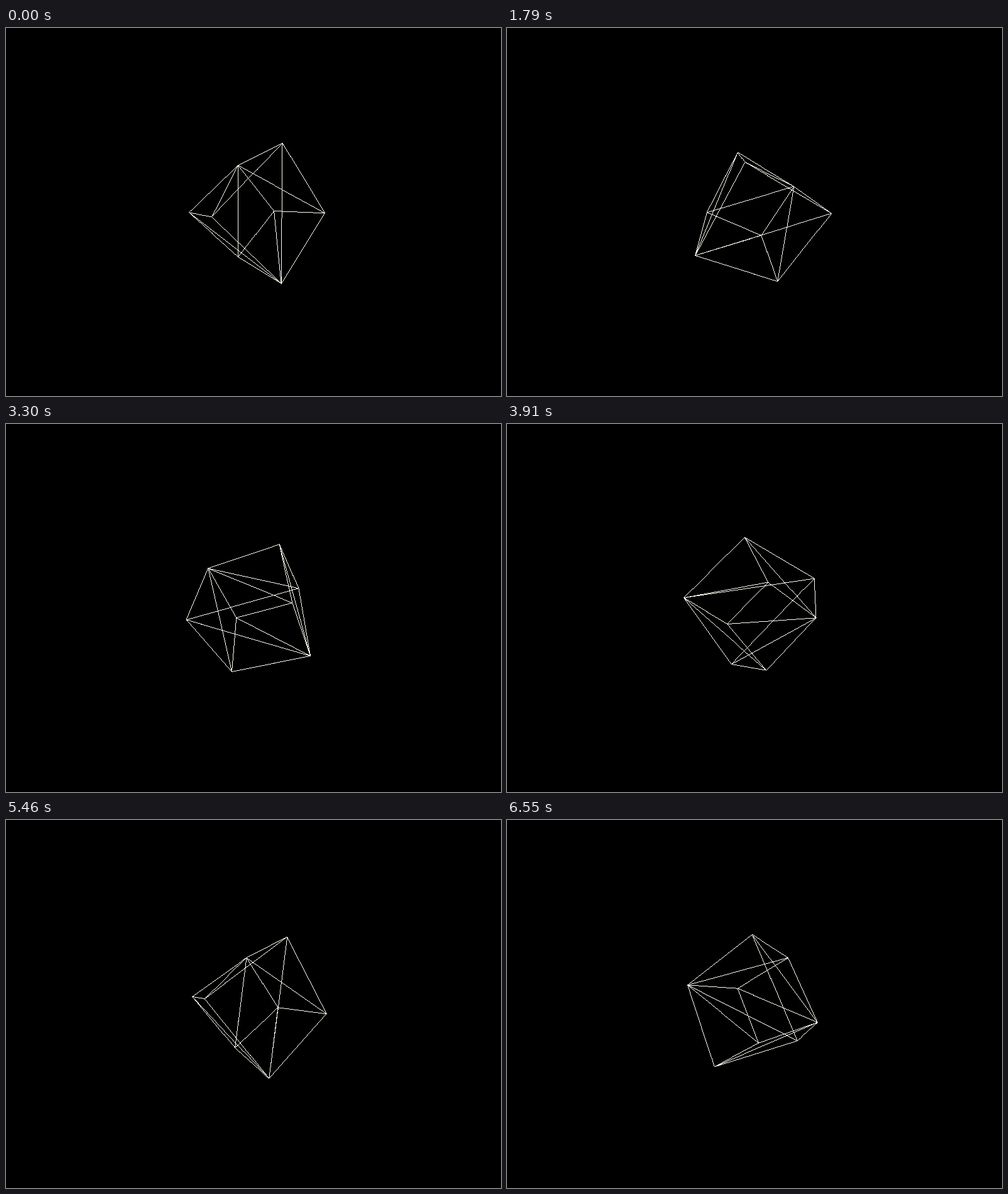
These frames come from a looping animation (788x586 px, 6.6 s). An HTML page with a canvas:

```html
<!DOCTYPE html>
<html>
<head>
<meta charset="utf-8">
<style>
  html, body { margin: 0; width: 100%; height: 100%; overflow: hidden; background: #000; }
  canvas { display: block; }
</style>
</head>
<body>
<canvas id="stage" width="788" height="586"></canvas>
<script>
const ctx = document.getElementById('stage').getContext('2d');
const LOOP = 6600, STEPS = 140;
const CENTER = [396.4, 293.8], FOCAL = 250, DISTANCE = 4;
const AXIS = [1, 2, 3].map(v => v / Math.sqrt(14));

// [step, angle in radians]: an almost constant spin
const SPIN = [[0, .965], [18, 1.922], [38, 2.993], [57, 3.986], [83, 5.357], [116, 7.09], [139, 8.343]];

const corners = [];
for (const x of [-1, 1]) for (const y of [-1, 1]) for (const z of [-1, 1]) corners.push([x, y, z]);

// Cube edges, plus the face diagonals that start at two opposite corners
const isHub = ([x, y, z]) => x === y && y === -z;
const lines = [];
corners.forEach((a, i) => corners.forEach((b, j) => {
  if (j <= i) return;
  const differing = a.filter((v, k) => v !== b[k]).length;
  if (differing === 1 || (differing === 2 && (isHub(a) || isHub(b)))) lines.push([i, j]);
}));

// Steps are evenly spaced, each starting on a whole 10 ms
function stepAt(time) {
  const tick = Math.floor(time % LOOP / 10) * 10;
  return Math.min(STEPS - 1, Math.floor((tick + 9.9) * STEPS / LOOP));
}

function angleAt(step) {
  let i = 1;
  while (step > SPIN[i][0]) i++;
  const [s0, a0] = SPIN[i - 1], [s1, a1] = SPIN[i];
  return a0 + (a1 - a0) * (step - s0) / (s1 - s0);
}

function rotate([x, y, z], angle) {
  const [a, b, c] = AXIS, cos = Math.cos(angle), sin = Math.sin(angle);
  const along = (a * x + b * y + c * z) * (1 - cos);
  return [
    x * cos + (b * z - c * y) * sin + a * along,
    y * cos + (c * x - a * z) * sin + b * along,
    z * cos + (a * y - b * x) * sin + c * along
  ];
}

function project([x, y, z]) {
  const scale = FOCAL / (DISTANCE - z);
  return [CENTER[0] + x * scale, CENTER[1] - y * scale];
}

// One-pixel line without smoothing
function drawLine([x0, y0], [x1, y1]) {
  const n = Math.ceil(Math.max(Math.abs(x1 - x0), Math.abs(y1 - y0), 1));
  for (let i = 0; i <= n; i++) {
    ctx.fillRect(Math.round(x0 + (x1 - x0) * i / n), Math.round(y0 + (y1 - y0) * i / n), 1, 1);
  }
}

function draw(time) {
  const angle = angleAt(stepAt(time));
  const points = corners.map(p => project(rotate(p, angle)));
  ctx.fillStyle = '#000';
  ctx.fillRect(0, 0, 788, 586);
  ctx.fillStyle = '#fffff0';
  for (const [i, j] of lines) drawLine(points[i], points[j]);
}

const start = performance.now();
function tick() {
  draw(performance.now() - start);
  requestAnimationFrame(tick);
}
tick();
</script>
</body>
</html>
```
